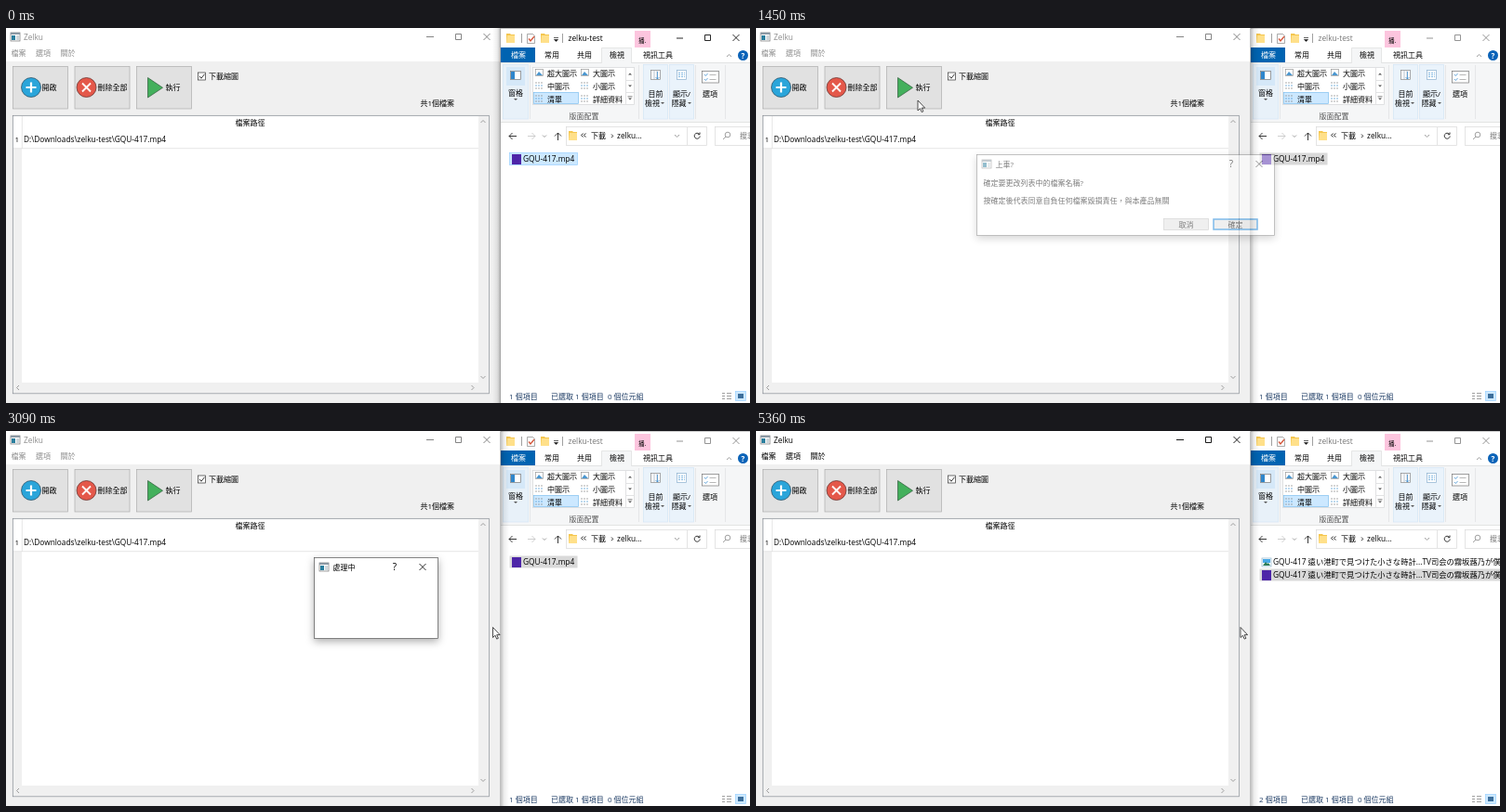
Write an HTML page that moves like this. It is 800 by 404 pixels and loops after 6000 ms.

```html
<!DOCTYPE html>
<html>
<head>
<meta charset="utf-8">
<title>Batch rename</title>
<style>
html, body { margin: 0; width: 100%; height: 100%; overflow: hidden; background: #fff; }
svg { display: block; width: 800px; height: 404px; stroke-width: .7; }
text { font: 8px "Open Sans", "Noto Sans CJK TC", "Noto Sans CJK JP", sans-serif; fill: #000; white-space: pre; }
.l { font-size: 8.3px; }
.mid { text-anchor: middle; }
.line { fill: none; stroke: #222; stroke-width: .9; }
.thin { fill: none; stroke: #888; stroke-width: .8; }
.tri { fill: #555; }
.btn { fill: #e1e1e1; stroke: #adadad; }
.btn.hover { fill: #e5f1fb; stroke: #0078d7; }
.btn.down { fill: #cce4f7; stroke: #005499; }
.ok { stroke: #0078d7; stroke-width: 1.5; }
#app .dim text, #app text.dim { fill: #8c8c8c; }
#app .dim path { stroke: #777; }
#app.active .dim text, #app.active text.dim { fill: #000; }
#app.active .dim path { stroke: #000; }
#explorer .cap { fill: #777; }
#explorer .ctl { stroke: #888; }
#explorer.active .cap { fill: #000; }
#explorer.active .ctl { stroke: #111; }
#edge { stroke: #a8a8a8; }
.active #edge { stroke: #8a8a8a; }
#over, .active #under { display: none; }
.active #over { display: inline; }
.pick { fill: #d9d9d9; }
.active .pick { fill: #cce8ff; stroke: #99d1ff; }
.dlg { filter: drop-shadow(0 3px 4px rgba(0,0,0,.32)); }
</style>
</head>
<body>
<svg viewBox="0 0 800 404" xmlns="http://www.w3.org/2000/svg">
<defs>
  <linearGradient id="shade">
    <stop offset="0" stop-opacity="0"/>
    <stop offset=".6" stop-opacity=".07"/>
    <stop offset="1" stop-opacity=".24"/>
  </linearGradient>
  <g id="win">
    <rect width="10" height="9" fill="#fff" stroke="#777"/>
    <rect width="10" height="2" fill="#8b98a3"/>
    <rect x="1" y="3" width="4" height="5" fill="#2b7f9e"/>
    <rect x="6" y="3" width="3" height="5" fill="#cfd8dc"/>
  </g>
  <g id="folder">
    <path d="M0 0h4l1 1h4v9H0z" fill="#f4c64f"/>
    <path d="M1 2h8v8H0z" fill="#ffe08a"/>
  </g>
  <path id="cross" d="M-3.5-3.5l7 7M3.5-3.5l-7 7" stroke-width=".9"/>
  <path id="drop" class="tri" d="M-2-1h4l-2 2z"/>
  <g id="film"><rect width="10" height="11" fill="#4d25a8"/></g>
  <g id="photo">
    <rect width="10" height="9" fill="#fff" stroke="#8fb4cc"/>
    <rect x="1" y="1" width="8" height="4" fill="#48a9e6"/>
    <path d="M1 8l3-4 2 2 1-1 2 3z" fill="#2d7d58"/>
  </g>
</defs>

<g id="app">
  <rect width="532" height="404" fill="#f0f0f0"/>
  <rect width="532" height="36" fill="#fff"/>
  <use href="#win" x="5" y="5"/>
  <text class="l dim" x="19" y="12.5">Zelku</text>
  <g class="dim">
    <text x="5.5" y="30">檔案</text><text x="32" y="30">選項</text><text x="58.5" y="30">關於</text>
    <path class="line" d="M452 9.5h8M483.5 6.5h6v6h-6zM513.500 6l7 7M520.500 6l-7 7"/>
  </g>

  <rect class="btn" x="7.500" y="41.500" width="59" height="45.500"/>
  <rect class="btn" id="clear" x="74" y="41.500" width="59" height="45.500"/>
  <rect class="btn" id="run" x="140.500" y="41.500" width="59" height="45.500"/>
  <circle cx="27" cy="64" r="10.500" fill="#2aa5da" stroke="#2b4a5c"/>
  <path d="M27 58.500v11M21.500 64h11" stroke="#fff" stroke-width="2.200"/>
  <circle cx="86.500" cy="64" r="10.500" fill="#e4584a" stroke="#5c2e2b"/>
  <path d="M82 59.500l9 9M91 59.500l-9 9" stroke="#fff" stroke-width="1.800"/>
  <path d="M152.500 53.500v21.500l16-10.700z" fill="#43b05c" stroke="#2f5a3a" stroke-linejoin="round"/>
  <text x="38.500" y="67">開啟</text><text x="98.500" y="67">刪除全部</text><text x="171.500" y="67">執行</text>
  <rect x="206.500" y="48" width="8" height="8" fill="#fff" stroke="#333"/>
  <path class="line" d="M208 52l2 2.200 3.500-4.500"/>
  <text x="218" y="55">下載縮圖</text>
  <text x="445.500" y="83.500">共1個檔案</text>

  <rect x="7.300" y="94.300" width="512" height="299.500" fill="#fff" stroke="#828790"/>
  <rect x="8" y="130" width="9" height="252" fill="#f0f0f0"/>
  <rect id="head" x="17" y="95" width="491" height="15" fill="#fff"/>
  <path d="M17.300 95v35M8 129.700h500" stroke="#dcdcdc" fill="none"/>
  <rect x="508" y="95" width="11" height="298" fill="#f0f0f0"/>
  <rect x="8" y="382" width="511" height="11" fill="#f0f0f0"/>
  <path class="thin" d="M510.500 102l2.500-2.500 2.500 2.500M510.500 375l2.500 2.500 2.500-2.500M14 385l-2.500 2.500 2.500 2.500M500.500 385l2.500 2.500-2.500 2.500"/>
  <text class="mid" x="262.500" y="105">檔案路徑</text>
  <text x="9.500" y="123">1</text>
  <text class="l" x="19" y="122.500">D:\Downloads\zelku-test\GQU-417.mp4</text>
</g>

<g id="explorer">
  <rect id="over" x="523" width="8.500" height="404" fill="url(#shade)"/>
  <rect x="531.500" width="268.500" height="404" fill="#fff"/>
  <path id="edge" d="M800 .3H531.500V404" fill="none"/>
  <use href="#folder" x="538" y="6"/>
  <path d="M554.500 6v10M598.500 6v10" stroke="#777"/>
  <path d="M560.500 6.500h6l2 2v8h-8z" fill="#fff" stroke="#888"/>
  <path d="M562 11.500l2 2.500 4-5" fill="none" stroke="#d4553a" stroke-width="1.300"/>
  <use href="#folder" x="575" y="6"/>
  <path d="M589 10.500h5M589.500 12.500h4l-2 2z" fill="#222" stroke="#222"/>
  <text class="l cap" x="604.500" y="14">zelku-test</text>
  <rect x="676" y="3" width="17" height="18" fill="#fcc5de"/>
  <text x="680" y="15.500" style="font-size:6.500px">播.</text>
  <path class="line ctl" d="M721 11h7M751.500 7.500h6v6h-6z"/>
  <use href="#cross" class="ctl" x="785" y="10.500"/>

  <rect x="532" y="37" width="268" height="65" fill="#f5f6f7"/>
  <path d="M532 37.500H640.500V21.500H672.500V37.500H800M532 101.500h268" fill="none" stroke="#dadbdc"/>
  <rect x="641" y="22" width="31" height="17" fill="#f5f6f7"/>
  <rect x="532" y="21" width="37" height="16" fill="#0063b1"/>
  <text x="543" y="32" style="fill:#fff">檔案</text>
  <text x="579" y="32">常用</text><text x="614" y="32">共用</text>
  <text x="649" y="32">檢視</text><text x="685" y="32">視訊工具</text>
  <path class="thin" d="M775 31l2.500-2.500 2.500 2.500"/>
  <circle cx="792.500" cy="29.500" r="5.500" fill="#0b63b8"/>
  <text class="mid" x="792.500" y="32.500" style="fill:#fff;font-weight:700">?</text>

  <path d="M563.500 40v58M680.500 40v58M741.500 40v58M773.500 40v58" stroke="#dfe0e1"/>
  <rect x="534.500" y="39.500" width="27" height="58.500" fill="#e8f1f9" stroke="#d3e5f5"/>
  <rect x="538" y="42" width="20" height="20" fill="#d5e8f8"/>
  <rect x="542.500" y="46.500" width="11" height="9" fill="#fff" stroke="#777"/>
  <rect x="543" y="47" width="4" height="8" fill="#2f86cc"/>
  <text x="540" y="73">窗格</text>
  <use href="#drop" x="548" y="77"/>

  <rect x="566.500" y="42.500" width="109" height="40" fill="#fff" stroke="#d5d6d7"/>
  <rect x="567.500" y="69.500" width="48" height="12" fill="#cce8ff" stroke="#7fbfee"/>
  <path d="M666.500 43v39M667 56.500h8M667 69.500h8" stroke="#d5d6d7"/>
  <path class="tri" d="M669 50.500l2-2 2 2zM669 61.500l2 2 2-2zM669 75.500l2 2 2-2zM668.500 73.500h5v.8h-5z"/>
  <g id="views"></g>
  <text class="mid" x="621.500" y="98" style="fill:#555">版面配置</text>

  <rect x="685.500" y="39.500" width="26" height="58.500" fill="#eaf3fb" stroke="#d3e5f5"/>
  <rect x="713.500" y="39.500" width="26" height="58.500" fill="#eaf3fb" stroke="#d3e5f5"/>
  <rect x="693.500" y="45.500" width="10" height="10" fill="#fff" stroke="#888"/>
  <path d="M697 46v9M700 46v9" stroke="#9ab"/>
  <path d="M700.500 47v8m-2-2l2 2 2-2" fill="none" stroke="#2f86cc"/>
  <rect x="721.500" y="45.500" width="10" height="10" fill="#fff" stroke="#8ab0cf"/>
  <path d="M723 48.500h7M723 50.500h7M723 52.500h7" stroke="#4b9ad6" stroke-dasharray="2 1"/>
  <text x="690.500" y="73.500">目前</text><text x="687" y="83.500">檢視</text>
  <text x="717" y="73.500">顯示/</text><text x="715.500" y="83.500">隱藏</text>
  <use href="#drop" x="706" y="81"/><use href="#drop" x="735" y="81"/>
  <rect x="748.500" y="46.500" width="18" height="12.500" fill="#fff" stroke="#777"/>
  <path d="M751 50l1.500 1.500 2-2.500M751 55l1.500 1.500 2-2.500" fill="none" stroke="#2f86cc"/>
  <path d="M756.500 50.500h7M756.500 55.500h7" stroke="#999"/>
  <text x="749" y="73.500">選項</text>

  <path class="line" d="M549 116.500h-8m3.500-3.500l-3.500 3.500 3.500 3.500"/>
  <path d="M561 116.500h8m-3.500-3.500l3.500 3.500-3.500 3.500" fill="none" stroke="#bbb"/>
  <path class="thin" d="M577 115.500l2 2 2-2"/>
  <path class="line" d="M593.500 121v-8m-3.500 3.500l3.500-3.500 3.500 3.500"/>
  <rect x="602.500" y="106.500" width="151" height="20" fill="#fff" stroke="#d9d9d9"/>
  <path d="M732.500 107v19" stroke="#d9d9d9"/>
  <use href="#folder" x="605" y="111"/>
  <path class="line" d="M620.500 113.500l-2 2 2 2M623.500 113.500l-2 2 2 2"/>
  <text x="629" y="118.500">下載</text>
  <path class="line" d="M651 114.500l1.700 1.800-1.700 1.800"/>
  <text class="l" x="657" y="118.500">zelku...</text>
  <path class="thin" d="M719 115l2.500 2.500 2.500-2.500"/>
  <path class="line" d="M745.500 114.300a3 3 0 1 0 .7 2.200M746 112.500v2.200h-2.200"/>
  <rect x="762.500" y="106.500" width="40" height="20" fill="#fff" stroke="#d9d9d9"/>
  <circle class="thin" cx="776" cy="115" r="2.800"/><path class="thin" d="M774 117l-3 3"/>
  <text x="789" y="118.500" style="fill:#777">搜尋</text>

  <g id="files"></g>
  <text id="count" x="541" y="400" style="fill:#1b3a63">1 個項目</text>
  <text x="586" y="400" style="fill:#1b3a63">已選取 1 個項目  0 個位元組</text>
  <path d="M770 393.500h3M770 396.500h3M770 399.500h3M775 393.500h5M775 396.500h5M775 399.500h5" stroke="#777"/>
  <rect x="784.500" y="391.500" width="11" height="10" fill="#cce8ff" stroke="#99d1ff"/>
  <rect x="787" y="394" width="6" height="5" fill="#3c6f9c"/>
  <rect id="under" x="-541" width="9" height="404" fill="url(#shade)" transform="scale(-1 1)"/>
</g>

<g id="dialogs"></g>
<path id="cursor" d="M.5.5v11l2.500-2.300 1.700 3.900 1.700-.8-1.700-3.700h3.400z" fill="#fff" stroke="#222" stroke-width=".8"/>
</svg>

<script>
const $ = id => document.getElementById(id);
const LOOP = 6000, TICKS = 66;
const SHORT = 'GQU-417.mp4';
const LONG_NAME = 'GQU-417 遠い港町で見つけた小さな時計...TV司会の霧坂蕗乃が僕の小箱';

// tick, x, y of the pointer tip
const PATH = [
  [1, 130, 106], [3, 122, 92], [7, 114, 84], [8, 122, 84], [10, 156, 80], [12, 174, 78],
  [20, 174, 78], [22, 260, 112], [24, 440, 186], [26, 526, 217], [28, 526, 217],
  [31, 575, 217], [34, 523.500, 211.500], [47, 523.500, 211.500], [48, 521, 211.500]
];

const LAYOUTS = ['超大圖示', '大圖示', '中圖示', '小圖示', '清單', '詳細資料'];
$('views').innerHTML = LAYOUTS.map((name, i) => {
  const x = i % 2 ? 618 : 569, y = 44 + 14 * (i >> 1);
  const icon = i < 2
    ? `<rect x="${x + .5}" y="${y + .5}" width="8" height="7" fill="#fff" stroke="#999"/><path d="M${x + 1} ${y + 7}l3-4 4 4z" fill="#4a96cf"/>`
    : [0, 3, 6].map(d => `<path d="M${x} ${y + d + 1}h2m1 0h2m1 0h2" stroke="${d === 3 ? '#4a96cf' : '#888'}"/>`).join('');
  return icon + `<text x="${x + 13}" y="${y + 7.5}">${name}</text>`;
}).join('');

function dialog(id, x, width, title, body) {
  const r = x + width;
  return `<g id="${id}"><rect class="dlg" x="${x + .5}" y="136.500" width="${width}" height="87" fill="#fff" stroke="#555"/>
    <use href="#win" x="${x + 6}" y="142"/><text x="${x + 20.5}" y="149.500">${title}</text>
    <text class="mid" x="${r - 46}" y="150" style="font-size:10px">?</text>
    <use href="#cross" x="${r - 16}" y="146.500" stroke="#111"/>${body}</g>`;
}
$('dialogs').innerHTML = dialog('confirm', 237, 320, '上車?', `
    <text x="244.500" y="170">確定要更改列表中的檔案名稱?</text>
    <text x="244.500" y="189">按確定後代表同意自負任何檔案毀損責任，與本產品無關</text>
    <rect class="btn" x="438.500" y="205.500" width="48" height="12"/>
    <rect class="btn ok" id="ok" x="492" y="206" width="47" height="11"/>
    <text class="mid" x="462.500" y="214.500">取消</text><text class="mid" x="515.500" y="214.500">確定</text>`)
  + dialog('busy', 331, 133, '處理中', '');

function row(i, icon, name, picked) {
  const y = 135 + 14 * i, width = name === LONG_NAME ? 262 : 73;
  return (picked ? `<rect class="pick" x="541.500" y="${y - .5}" width="${width}" height="13"/>` : '')
    + `<use href="#${icon}" x="544" y="${y + (icon === 'photo' ? 2 : 1)}"/><text class="l" x="556" y="${y + 9}">${name}</text>`;
}
const LISTS = [
  row(0, 'film', SHORT, true),
  row(0, 'film', SHORT, true) + row(1, 'photo', LONG_NAME, false),
  row(0, 'photo', LONG_NAME, false) + row(1, 'film', LONG_NAME, true)
];

function pointer(k) {
  const i = PATH.findIndex(p => p[0] > k);
  if (i < 0) return PATH[PATH.length - 1].slice(1);
  const [t0, x0, y0] = PATH[Math.max(0, i - 1)], [t1, x1, y1] = PATH[i];
  const f = Math.max(0, (k - t0) / (t1 - t0));
  return [x0 + (x1 - x0) * f, y0 + (y1 - y0) * f];
}

function fade(id, opacity) {
  $(id).style.display = opacity ? '' : 'none';
  $(id).style.opacity = opacity;
}

function show(k) {
  const [x, y] = pointer(k);
  const free = k > 0 && k < 16;
  const onBar = free && y > 41 && y < 88;
  $('cursor').style.display = k ? '' : 'none';
  $('cursor').setAttribute('transform', `translate(${x - .5} ${y - .5})`);
  $('clear').classList.toggle('hover', onBar && x > 74 && x < 134);
  $('run').classList.toggle('hover', onBar && x > 140 && x < 200);
  $('run').classList.toggle('down', k === 15);
  $('head').setAttribute('fill', free && y > 95 && y < 110 ? '#d9ebf9' : '#fff');
  $('ok').classList.toggle('hover', k > 25);
  $('ok').classList.toggle('down', k === 27);
  $('app').classList.toggle('active', k === 15 || k >= 59);
  $('explorer').classList.toggle('active', k < 15);
  fade('confirm', k < 16 || k > 28 ? 0 : k === 16 ? .5 : k === 28 ? .4 : 1);
  fade('busy', k < 29 || k > 58 ? 0 : k === 29 ? .5 : k === 58 ? .4 : 1);
  $('files').innerHTML = LISTS[k < 53 ? 0 : k < 54 ? 1 : 2];
  $('count').textContent = (k < 53 ? 1 : 2) + ' 個項目';
}

let last = -1;
const start = performance.now();
function tick() {
  const t = (performance.now() - start) % LOOP;
  const k = Math.min(TICKS - 1, Math.floor((t + 10) * TICKS / LOOP));
  if (k !== last) show(last = k);
  requestAnimationFrame(tick);
}
tick();
</script>
</body>
</html>
```
